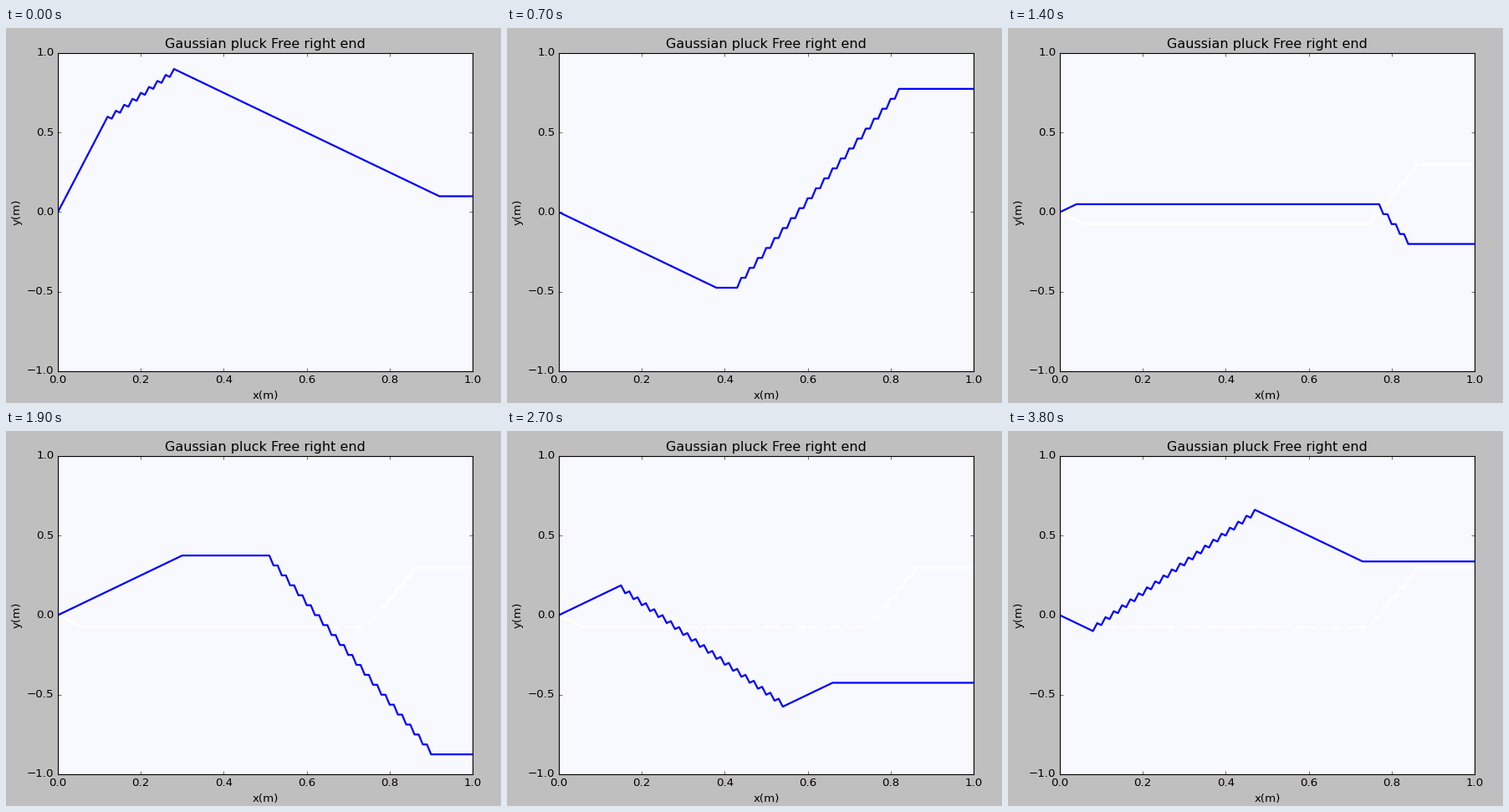
A matplotlib script that plays this animation: 592 by 449 pixels, repeating every 3900 ms.

```python
import numpy as np
import matplotlib.pyplot as plt
from matplotlib.animation import FuncAnimation

W, H, DPI = 592, 449, 80
PAPER = "#f8f8ff"
CELLS = 100       # string segments
HALF = 201        # steps in half an oscillation

plt.rcParams.update({
    "font.family": "DejaVu Sans",
    "font.size": 12,
    "axes.titlesize": 14.4,
    "axes.titlepad": 5,
    "axes.labelsize": 12,
    "axes.labelpad": 5,
    "axes.linewidth": 1.0,
    "xtick.direction": "in",
    "ytick.direction": "in",
    "xtick.top": True,
    "ytick.right": True,
    "xtick.major.size": 4,
    "ytick.major.size": 4,
    "xtick.major.width": 0.5,
    "ytick.major.width": 0.5,
    "xtick.major.pad": 4,
    "ytick.major.pad": 4,
    "ytick.alignment": "center",
    "lines.solid_joinstyle": "round",
})

x = np.linspace(0, 1, CELLS + 1)
cell = np.arange(CELLS)


def slope(j):
    """Travelling-wave increment: gentle ramp with a burst of steep steps."""
    half, r = np.divmod(j, HALF)
    sign = np.where(half % 2 == 0, -1, 1)
    steep = (r >= 81) & (r <= 119) & (r % 2 == 1)
    return 0.00625 * sign * np.where(steep, -9, 1)


def string_at(step):
    """Sum of the two opposite waves; left end fixed, right end free."""
    rise = slope(step + cell + 1) + slope(step - cell)
    return np.concatenate([[0], np.cumsum(rise)])


# Simulation steps between pictures; the run slows down, then restarts.
STRIDES = ([8] * 6 + [6, 6, 8, 6, 6, 6] + [6, 4] * 3 + [6, 4, 4, 6, 4, 6]
           + [4] * 5 + [6] + [4] * 4)
STEPS = list(108 + np.cumsum([0] + STRIDES)) + [105, 113, 121, 127]
CURVES = [string_at(s) for s in STEPS]
GHOST = 12        # picture that leaves a white trace behind

fig = plt.figure(figsize=(W / DPI, H / DPI), dpi=DPI, facecolor="0.75")
ax = fig.add_axes([62 / W, 38 / H, 496 / W, 381 / H], facecolor=PAPER)
ax.set(xlim=(0, 1), ylim=(-1, 1), xlabel="x(m)", ylabel="y(m)",
       xticks=np.linspace(0, 1, 6), yticks=np.linspace(-1, 1, 5))
ax.set_title("Gaussian pluck Free right end")

ghost, = ax.plot(x, CURVES[GHOST], color="white", lw=2.7, zorder=2)
# Later curves rub out the trace wherever they crossed it.
wipes = [ax.plot(x, y, color=PAPER, lw=2.7, zorder=2.1)[0]
         for y in CURVES[GHOST + 1:]]
line, = ax.plot(x, CURVES[0], color="blue", lw=2, zorder=2.2)


def draw(i):
    line.set_ydata(CURVES[i])
    ghost.set_visible(i > GHOST)
    for k, wipe in enumerate(wipes, GHOST + 1):
        wipe.set_visible(k < i)
    return [ghost, *wipes, line]


anim = FuncAnimation(fig, draw, frames=len(CURVES), init_func=lambda: draw(0),
                     interval=100, repeat=True, repeat_delay=0)
plt.show()
```
